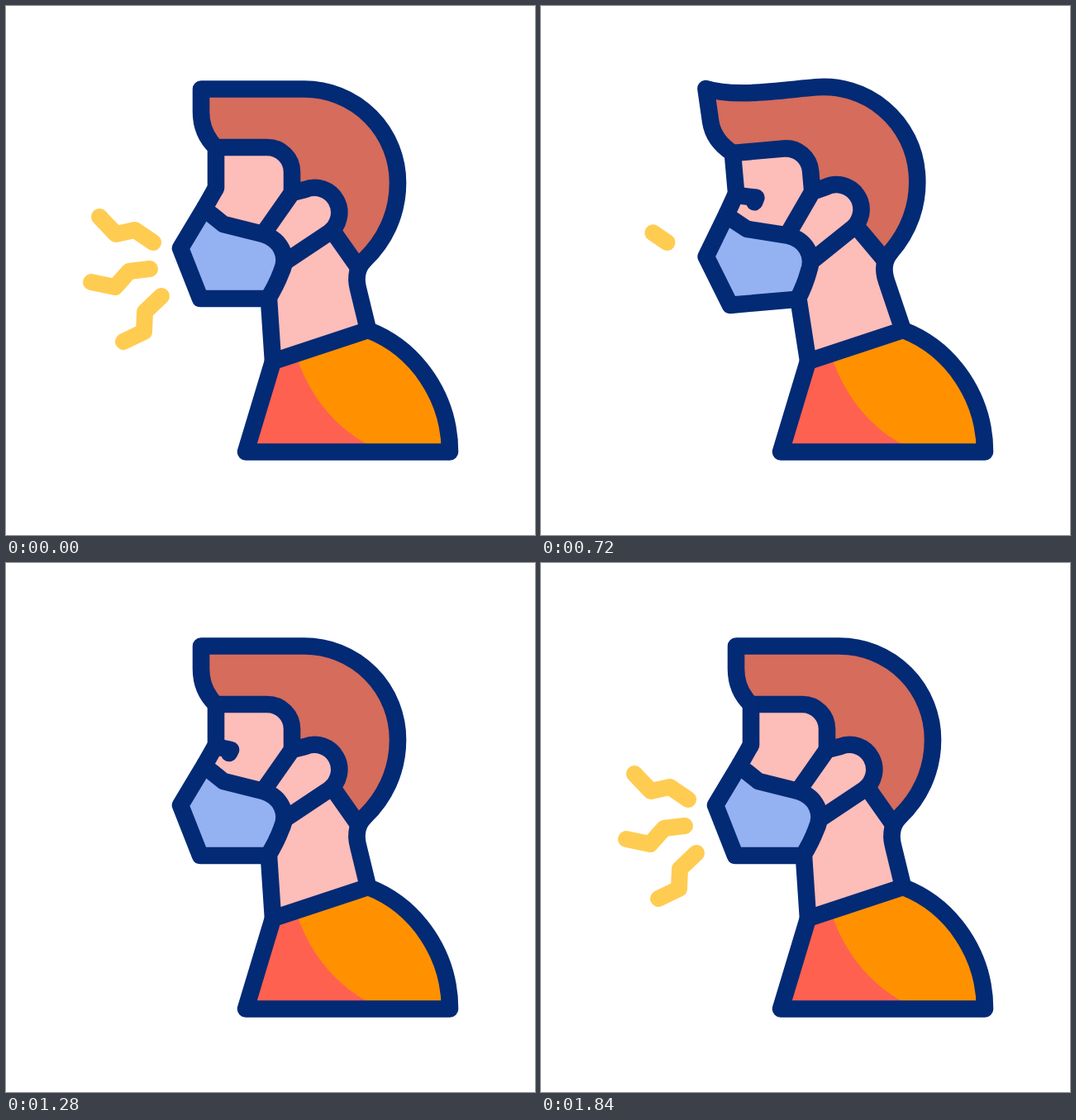
An HTML page for the animation above (3.02 s loop, 640x640 px).

```html
<!DOCTYPE html>
<html lang="en">
<head>
<meta charset="utf-8">
<title>Coughing man in a mask</title>
<style>
  html, body { margin: 0; width: 100%; height: 100%; overflow: hidden; background: #fff; }
  svg { display: block; width: 100%; height: 100%; }
  path { stroke-width: 20; stroke-linecap: round; stroke-linejoin: round; fill: none; }
  .ink { stroke: #032a75; stroke-width: 20.6; }
  .skin { fill: #fdbdb9; }
  .hair { fill: #d56c5c; }
  .mask { fill: #94b1f2; }
  .shirt { fill: #ff6150; }
  .light { fill: #ff9100; }
  #cough { stroke: #ffcc52; }
</style>
</head>
<body>
<svg viewBox="0 0 640 640">
  <g id="cough">
    <path pathLength="1" d="M178 286L156 271L133 276L113 255"/>
    <path pathLength="1" d="M174 318L149 321L132 340L103 334"/>
    <path pathLength="1" d="M188 351L168 370L167 394L142 406"/>
  </g>
  <g id="body">
    <g id="head">
      <path class="skin" d="M318 355L340 308L395 272L426 316Q423 330 426 342L443 412L323 430Z"/>
      <path class="skin" d="M254 171V220L241 243L263 264L313 276L346 226V171Z"/>
      <path class="ink" d="M434 307C424 317 423 330 426 342L443 412M318 355L323 430"/>
      <path class="ink hair" id="hair"/>
      <path class="ink" d="M254 171V220L241 243"/>
      <path class="ink" id="eye"/>
      <path class="ink skin" d="M313 273L346 226L362 222A30 30 0 0 1 391 274L340 308Z"/>
      <path class="ink mask" d="M243 248L263 264L311 276C333 283 342 303 333 322Q327 338 317 354H235L211 293L241 243"/>
    </g>
    <path class="shirt" d="M290 540L323 430L438 392C498 415 537 475 537 540Z"/>
    <path class="light" d="M350 420L438 392C498 415 537 475 537 540H440V532Q375 497 350 420Z"/>
    <path class="ink" d="M290 539.5L323 430L438 392C498 415 537 475 537 539.5Z"/>
  </g>
</svg>
<script>
const LOOP = 3020;
const [cough, body, head, hair, eye] =
  ['cough', 'body', 'head', 'hair', 'eye'].map(id => document.getElementById(id));

const ramp = (t, start, end) => Math.min(1, Math.max(0, (t - start) / (end - start)));
const ease = (t, start, end) => {
  const u = ramp(t, start, end);
  return u * u * (3 - 2 * u);
};
// Eases from 0 to 1, holds, then eases back to 0.
const swing = (t, start, top, leave, end) => ease(t, start, top) - ease(t, leave, end);
const pulse = (t, start, peak, end) => swing(t, start, peak, peak, end);

const rotate = (part, degrees, x, y) =>
  part.setAttribute('transform', `rotate(${-degrees} ${x} ${y})`);

// The fringe tip moves by (x, y); the rest of the outline follows it loosely.
function hairPath(x, y) {
  return `M${236 + x} ${100.5 + y}C${264 + x * .4} ${100.5 - x * .5} 315 100.5 361 100.5` +
    'A113 113 0 0 1 474 214C474 253 457 285 434 307L426 316L395 272L346 226V201' +
    `A30 30 0 0 0 316 171H254Q${236 + x * .5} 154 ${236 + x * .7} ${128 - x * .4}Z`;
}

// Each cough line grows from the mouth and is wiped the same way, one after another.
function trimLine(line, index, t) {
  const wipe = start => ramp(t - index * 40, start, start + 80);
  const from = t < 600 ? wipe(180) : t < 1200 ? wipe(820) : 0;
  const to = t < 600 ? 1 : t < 1200 ? wipe(700) : wipe(1380);
  line.style.display = to > from ? '' : 'none';
  line.style.strokeDasharray = to - from < 1 ? `${to - from} 3` : 'none';
  line.style.strokeDashoffset = -from;
}

function draw(t) {
  const firstLean = swing(t, 320, 720, 760, 1220);
  const secondLean = pulse(t, 1280, 1520, 1800);
  const bend = 1.16 * pulse(t, 180, 440, 700) + 2.1 * (pulse(t, 720, 900, 1220) + secondLean);
  const look = swing(t, 180, 440, 1280, 1760) + .3 * firstLean;

  rotate(body, bend, 290, 540);
  rotate(head, 5 * firstLean + 4 * secondLean, 322, 428);
  hair.setAttribute('d', hairPath(-7.5 * firstLean - 8 * secondLean, -10 * firstLean + 3 * secondLean));
  eye.setAttribute('d', `M253 222l${19 * look} ${4 * look}l${-2 * look} ${4 * look}`);
  cough.setAttribute('transform', `translate(${-25.5 * swing(t, 340, 440, 1280, 1600)})`);
  [...cough.children].forEach((line, i) => trimLine(line, i, t));
}

function tick() {
  draw(performance.now() % LOOP);
  requestAnimationFrame(tick);
}
tick();
</script>
</body>
</html>
```
